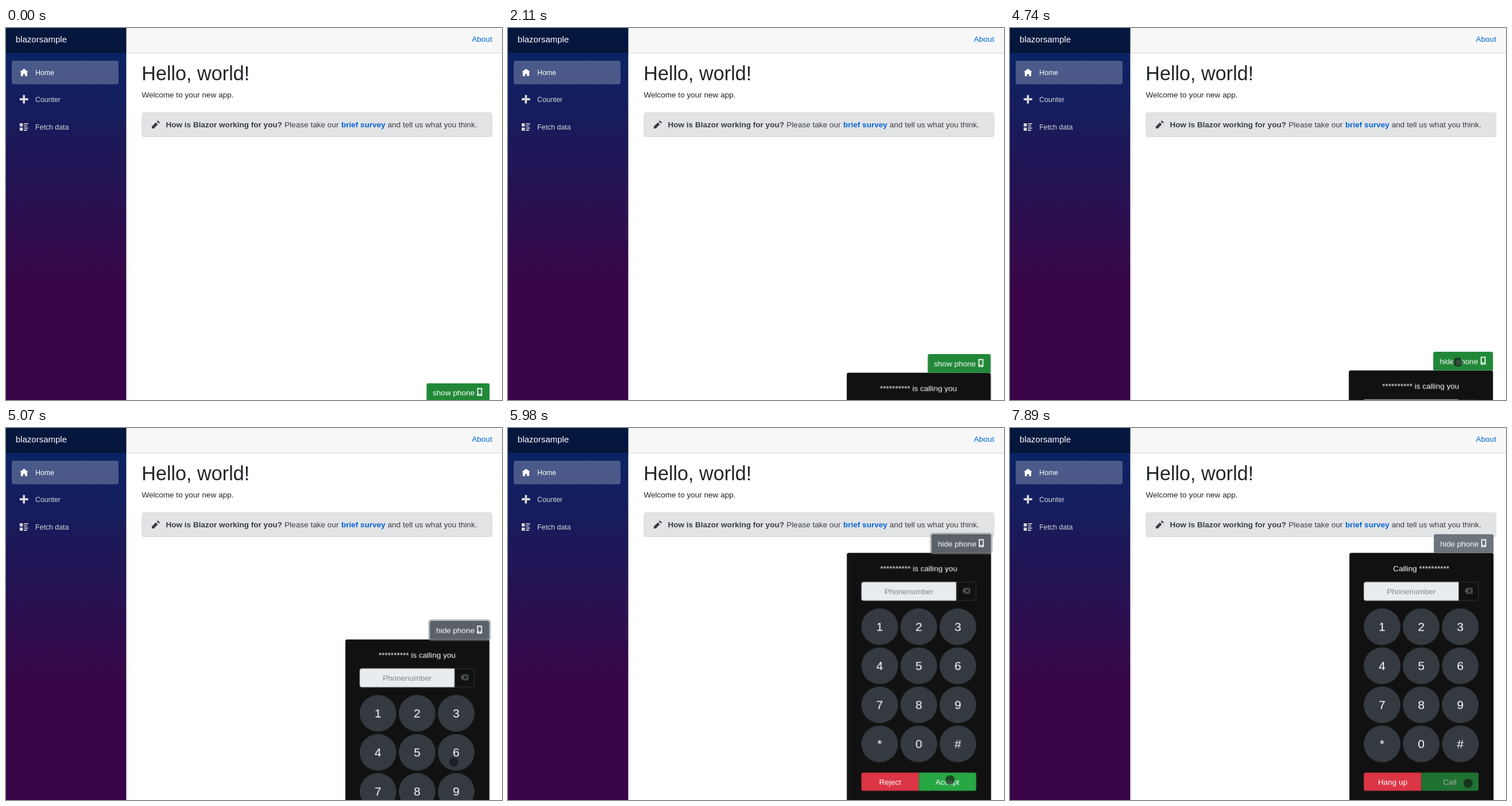
These frames come from a looping animation (864x648 px, 8000 ms). An HTML page:

```html
<!DOCTYPE html>
<html lang="en">
<head>
<meta charset="utf-8">
<title>Phone widget</title>
<style>
  html, body { margin: 0; width: 100%; height: 100%; overflow: hidden; background: #fff; }
  svg { display: block; width: 100%; height: 100%; }
  text { font: 13.55px "Liberation Sans", Arial, sans-serif; fill: #fff; white-space: pre; }
  .mid { text-anchor: middle; }
  .brand { font-size: 15px; }
  .nav { font-size: 12.35px; }
  .title { font-size: 34.2px; }
  .digit { font-size: 21px; }
  .dark { fill: #212529; }
  .note { fill: #383d41; }
  .bold { font-weight: bold; }
  .link { fill: #0366d6; }
  .soft { fill: #d7d7d7; }
</style>
</head>
<body>
<svg viewBox="0 0 864 648">
  <defs>
    <linearGradient id="night" x1="0" y1="0" x2="0" y2="1">
      <stop offset="0" stop-color="#052767"/>
      <stop offset=".7" stop-color="#3a0647"/>
    </linearGradient>
  </defs>

  <!-- page -->
  <rect x="209.5" width="655" height="43" fill="#f7f7f7"/>
  <rect x="209.5" y="43" width="655" height="1" fill="#d6d5d5"/>
  <rect width="209.5" height="648" fill="url(#night)"/>
  <rect width="209.5" height="43.5" fill="#000" opacity=".4"/>
  <text class="brand" x="16.8" y="25">blazorsample</text>
  <rect x="10" y="57" width="186" height="41" rx="3.4" fill="#fff" opacity=".25"/>
  <path transform="translate(24 71) scale(1.85)" fill="#fff" d="M4 0L0 3h1v4h2V5h2v2h2V3h1z"/>
  <path class="soft" transform="translate(23.8 116.7) scale(1.85)" d="M3 0v3H0v2h3v3h2V5h3V3H5V0z"/>
  <path class="soft" transform="translate(23.8 166) scale(1.85)"
    d="M0 0h3v3H0zM4 0h4v1H4zM4 2h3v1H4zM0 4h3v3H0zM4 4h4v1H4zM4 6h3v1H4z"/>
  <text class="nav" x="51" y="81.6">Home</text>
  <text class="nav soft" x="51" y="129.4">Counter</text>
  <text class="nav soft" x="51" y="177.1">Fetch data</text>
  <text class="link" x="811.5" y="23.8">About</text>
  <text class="title dark" x="236.2" y="91">Hello, world!</text>
  <text class="dark" x="236.4" y="121.2">Welcome to your new app.</text>
  <rect x="236.9" y="147.5" width="609.8" height="42" rx="3.2" fill="#e2e3e5" stroke="#d6d8db" stroke-width=".9"/>
  <path class="note" transform="translate(254 161) scale(1.75)" d="M6 0L5 1l2 2 1-1zM4 2L0 6v2h2l4-4z"/>
  <text class="note bold" x="278.5" y="173">How is Blazor working for you?</text>
  <text class="note" x="485.3" y="173">Please take our</text>
  <text class="link bold" x="584" y="173">brief survey</text>
  <text class="note" x="664.8" y="173">and tell us what you think.</text>

  <!-- phone -->
  <g id="slide"><g id="shake">
    <path d="M591.2 700V220.8q0-3.4 3.4-3.4H838.9q3.4 0 3.4 3.4V700z" fill="#111"/>
    <text id="ringing" class="mid" x="716.3" y="249">********** is calling you</text>
    <text id="calling" class="mid" x="716.3" y="249">Calling **********</text>

    <path d="M781.5 268.5H619.7q-3 0-3 3v26q0 3 3 3H781.5z" fill="#e9ecef" stroke="#ced4da" stroke-width=".8"/>
    <text class="mid" x="699" y="289" style="fill:#7b838a">Phonenumber</text>
    <path d="M781.9 268.5H812.9q3 0 3 3v26q0 3-3 3H781.9z" fill="none" stroke="#343a40" stroke-width=".9"/>
    <path transform="translate(792 278.4) scale(1.72)" fill="#51565a" fill-rule="evenodd"
      d="M2 0L0 3l2 3h6V0zM3.5.8L5 2.3 6.5.8l.7.7L5.7 3l1.5 1.5-.7.7L5 3.7 3.5 5.2l-.7-.7L4.3 3 2.8 1.5z"/>
    <g id="keys"></g>

    <path d="M716.5 600.3H619.7q-3.4 0-3.4 3.4v25q0 3.4 3.4 3.4H716.5z" fill="#dc3545"/>
    <path id="accept" d="M716.5 600.3H812.9q3.4 0 3.4 3.4v25q0 3.4-3.4 3.4H716.5z" fill="#28a745"/>
    <g id="offer" class="mid">
      <text x="666.4" y="621.2">Reject</text>
      <text x="766" y="621.2">Accept</text>
    </g>
    <g id="active" class="mid">
      <text x="666.6" y="621.2">Hang up</text>
      <text x="766" y="621.2" style="fill:#acacac">Call</text>
    </g>

    <path id="showTab" d="M732.6 217.5V188.4q0-3.4 3.4-3.4H838.9q3.4 0 3.4 3.4V217.5z" fill="#218838"/>
    <path id="hideTab" d="M738.2 217.5V188.4q0-3.4 3.4-3.4H838.9q3.4 0 3.4 3.4V217.5z" fill="#218838"/>
    <rect id="ring" x="736.9" y="183.7" width="106.7" height="35.1" rx="4.5" fill="none"
      stroke="#828a91" stroke-opacity=".5" stroke-width="2.7"/>
    <text id="showText" x="743.3" y="206">show phone</text>
    <text id="hideText" x="749.4" y="206">hide phone</text>
    <path transform="translate(820.8 193.6) scale(1.72)" fill="#fff" fill-rule="evenodd"
      d="M.2 0h4.6q.2 0 .2.2v7.6q0 .2-.2.2H.2Q0 8 0 7.8V.2Q0 0 .2 0zM1 1h3v5H1zM2 6.6h1v.8H2z"/>
  </g></g>

  <g id="pointer"><circle r="8" fill="#111" fill-opacity=".62"/></g>
</svg>
<script>
const LOOP = 8000, OPEN = 4720, ANSWER = 7060;
const $ = id => document.getElementById(id);

$('keys').innerHTML = [...'123456789*0#'].map((label, i) => {
  const x = 648.2 + i % 3 * 68.1, y = 346.2 + Math.floor(i / 3) * 68.05;
  return `<circle cx="${x}" cy="${y}" r="32" fill="#343a40"/>
    <text class="digit mid" x="${x}" y="${y + 7.4}">${label}</text>`;
}).join('');

// steps: [ms, value, easing to the next step]
function track(id, prop, steps) {
  const frame = (ms, value, easing = 'linear') => ({ offset: ms / LOOP, [prop]: value, easing });
  const frames = steps.map(step => frame(...step));
  if (steps[0][0] > 0) frames.unshift(frame(0, steps[0][1]));
  frames.push(frame(LOOP, steps.at(-1)[1]));
  $(id).animate(frames, { duration: LOOP, iterations: Infinity }).startTime = start;
}

const start = document.timeline.currentTime ?? 0;
const move = (x, y) => `translate(${x}px, ${y}px)`;
const until = (ms, ids) => ids.forEach(id => track(id, 'opacity', [[0, 1, 'step-end'], [ms, 0]]));
const since = (ms, ids) => ids.forEach(id => track(id, 'opacity', [[0, 0, 'step-end'], [ms, 1]]));

until(OPEN, ['showTab', 'showText']);
since(OPEN, ['hideTab', 'hideText']);
until(ANSWER, ['ringing', 'offer']);
since(ANSWER, ['calling', 'active']);

track('slide', 'transform', [
  [805, move(0, 433.5), 'ease'], [1805, move(0, 383)],
  [OPEN, move(0, 383), 'ease'], [OPEN + 1000, move(0, 0)],
]);

// ring shake: one swing per tenth of a cycle
const SHAKE_START = 872, CYCLE = 819, UNIT = 0.838;
const swings = [0, -1, 1, -2, 2, -2, 2, -2, 1, -1];
const shake = [];
for (let i = 0, ms; (ms = SHAKE_START + i * CYCLE / 10) < ANSWER; i++) {
  shake.push([ms, move(swings[i % 10] * UNIT, 0), 'cubic-bezier(.36,.07,.19,.97)']);
}
shake.at(-1)[2] = 'step-end';
track('shake', 'transform', [...shake, [ANSWER, move(0, 0)]]);

track('hideTab', 'fill', [
  [OPEN + 20, '#218838'], [OPEN + 150, '#5a6268'],
  [ANSWER - 20, '#5a6268'], [ANSWER + 20, '#6c757d'],
]);
track('ring', 'opacity', [[OPEN + 20, 0], [OPEN + 150, 1], [ANSWER - 20, 1], [ANSWER + 20, 0]]);
track('accept', 'fill', [[0, '#28a745', 'step-end'], [ANSWER, '#207233']]);

since(2900, ['pointer']);
track('pointer', 'transform', [
  [2900, move(838, 660), 'ease-out'], [3200, move(780, 582)],
  [5600, move(780, 582), 'ease-in-out'], [5950, move(770, 613)],
  [6200, move(770, 613)], [6500, move(769, 616)],
  [7650, move(769, 616), 'ease-in-out'], [7890, move(798, 619)],
]);
</script>
</body>
</html>
```
